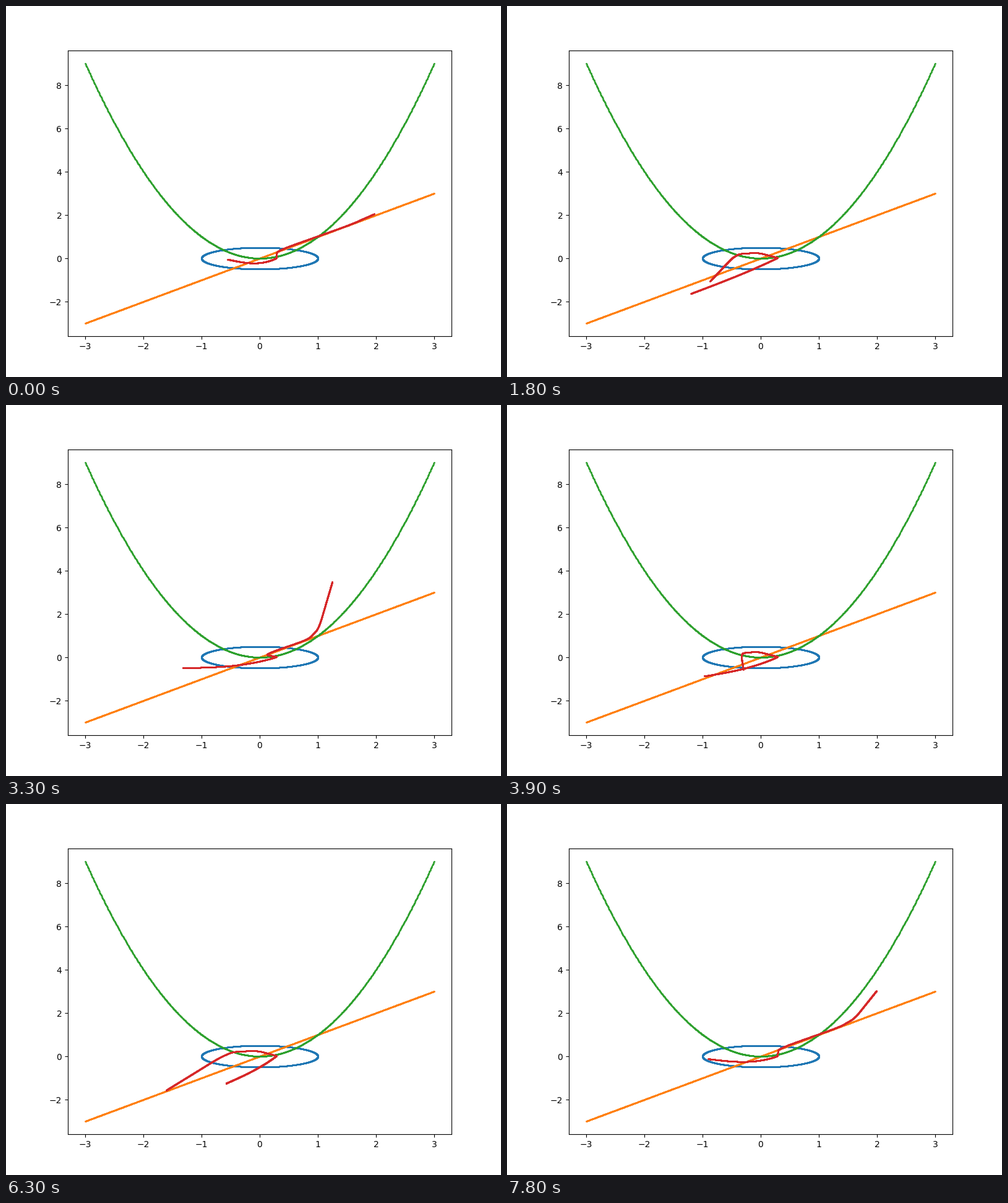
These frames come from a looping animation (800x600 px, 8 s). A matplotlib script:

```python
import numpy as np
import matplotlib.pyplot as plt
from matplotlib.animation import FuncAnimation

TICK_MS = 100
TICKS_PER_STEP = 3
LOOP_TICKS = 80
ANCHOR = np.array([0.29, 0.03])

# step: tip of the right arm (x, y), tip of the left arm (x, y)
TIPS = {
    0: (1.97, 2.05, -0.55, -0.05),
    3: (2.58, 7.20, -1.56, 0.00),
    6: (-0.87, -1.05, -1.20, -1.63),
    9: (1.26, 3.95, -1.84, -0.17),
    10: (2.02, 5.50, -1.50, -0.30),
    13: (-0.30, -0.56, -0.97, -0.87),
    17: (1.35, 2.50, -0.69, 0.53),
    21: (-1.61, -1.57, -0.58, -1.25),
    26: (1.99, 3.02, -0.90, -0.12),
}


def tips_at(step):
    values = [np.interp(step, list(TIPS), track) for track in zip(*TIPS.values())]
    return np.array(values[:2]), np.array(values[2:])


def round_corners(points, ratio=0.15, passes=4):
    for _ in range(passes):
        a, b = points[:-1], points[1:]
        cut = np.stack([a + ratio * (b - a), b - ratio * (b - a)], axis=1)
        points = np.vstack([points[:1], cut.reshape(-1, 2), points[-1:]])
    return points


def resample(points, count=500):
    length = np.r_[0, np.cumsum(np.hypot(*np.diff(points, axis=0).T))]
    s = np.linspace(0, length[-1], count)
    return np.array([np.interp(s, length, axis) for axis in points.T])


def right_arm(tip):
    """Follows the straight line when its tip is high, folds back when low."""
    high = np.clip((tip[0] + 0.3) / 1.5, 0, 1)
    fold = 0.3 * (tip[0] - 1)
    line = 0.78 * tip[0]
    elbow = high * np.array([fold, fold + 0.06]) + (1 - high) * np.array([-0.05, 0.27])
    bend = high * np.array([line, line]) + (1 - high) * np.array([-0.3 + 0.15 * tip[0], 0.2])
    return resample(round_corners(np.array([ANCHOR, elbow, bend, tip])))


def left_arm(tip):
    """Chord to the tip with a sag that grows as the tip rises."""
    u = np.linspace(0, 1, 500)
    x, y = ANCHOR[:, None] + (tip - ANCHOR)[:, None] * u
    sag = 0.22 + 0.1 * tip[1]
    return np.array([x, y - sag * np.sin(np.pi * u ** 0.8)])


fig, ax = plt.subplots(figsize=(8, 6), dpi=100)
dots = dict(marker="o", markersize=1, linestyle="none")

angle = np.linspace(0, 2 * np.pi, 1000)
x = np.linspace(-3, 3, 1000)
ax.plot(np.cos(angle), 0.5 * np.sin(angle), color="C0", **dots)
ax.plot(x, x, color="C1", **dots)
ax.plot(x, x ** 2, color="C2", **dots)
learned, = ax.plot([], [], color="C3", **dots)
ax.set_xlim(-3.3, 3.3)
ax.set_ylim(-3.6, 9.6)


def update(tick):
    right_tip, left_tip = tips_at(tick // TICKS_PER_STEP)
    learned.set_data(*np.hstack([right_arm(right_tip), left_arm(left_tip)]))
    return learned,


anim = FuncAnimation(fig, update, frames=LOOP_TICKS, interval=TICK_MS,
                     repeat=True, repeat_delay=0)
plt.show()
```
